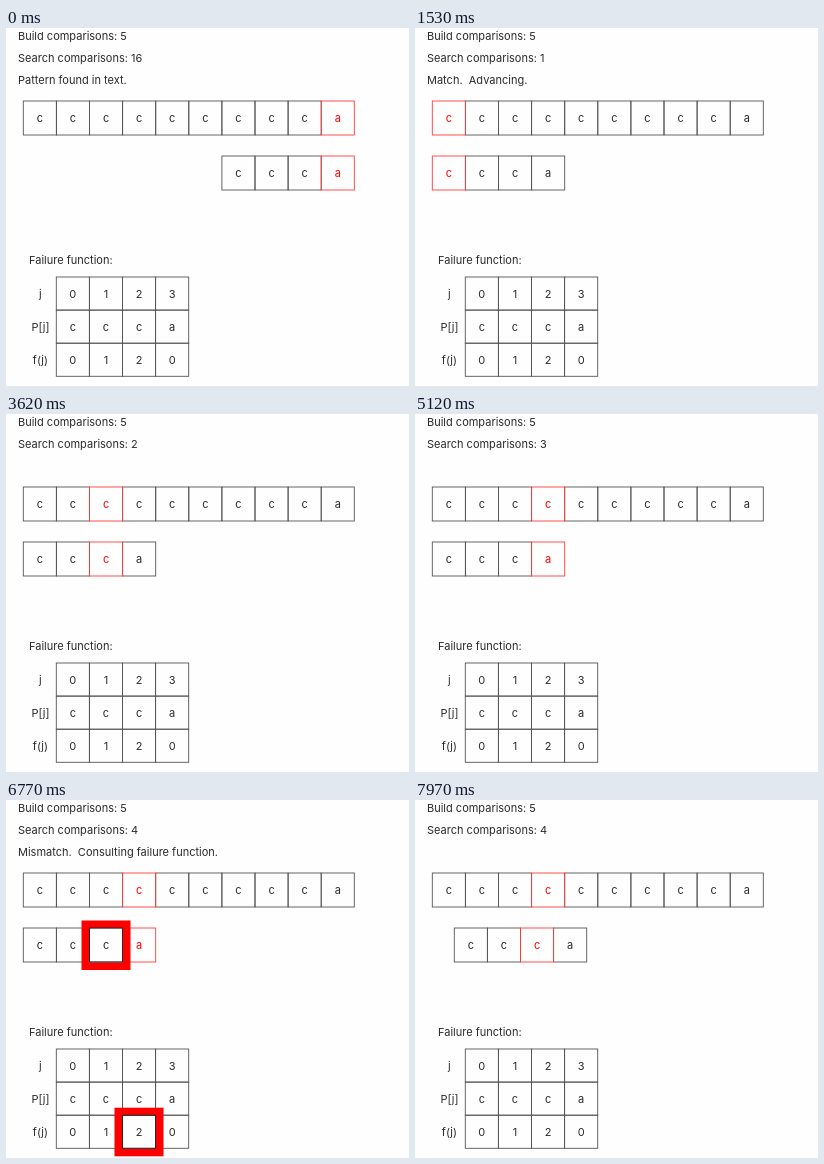
These frames come from a looping animation (403x358 px, 8000 ms). An HTML page:

```html
<!DOCTYPE html>
<html lang="en">
<head>
<meta charset="utf-8">
<title>String matching</title>
<style>
html, body { margin: 0; width: 100%; height: 100%; overflow: hidden; background: #fefefe; }
svg { display: block; width: 403px; height: 358px; }
text { font: 11px Inter, "DejaVu Sans", sans-serif; fill: #2a2a2a; white-space: pre; }
.cell rect { fill: none; stroke: #555; stroke-width: 0.9; }
.cell text, .head { text-anchor: middle; }
.cell.hot rect { stroke: #ff3c3c; }
.cell.hot text { fill: #f00; }
.cell.marked rect { stroke: #222; }
.frame { fill: none; stroke: #f00; }
</style>
</head>
<body>
<svg viewBox="0 0 403 358" id="stage"></svg>
<script>
const NS = "http://www.w3.org/2000/svg";
const stage = document.getElementById("stage");
const PITCH = 33.1, LOOP = 8000;

function add(parent, tag, attrs = {}, text = "") {
  const el = document.createElementNS(NS, tag);
  for (const key in attrs) el.setAttribute(key, attrs[key]);
  el.textContent = text;
  parent.append(el);
  return el;
}

const label = (x, y, text = "", cls = "") => add(stage, "text", { x, y, class: cls }, text);

function row(chars, x, y, h = 34) {
  const g = add(stage, "g");
  return { g, cells: [...chars].map((ch, i) => {
    const cell = add(g, "g", { class: "cell" });
    add(cell, "rect", { x: x + i * PITCH, y, width: PITCH, height: h });
    add(cell, "text", { x: x + (i + 0.5) * PITCH, y: y + h / 2 + 4 }, ch);
    return cell;
  }) };
}

label(12, 12, "Build comparisons: 5");
const count = label(12, 34);
const message = label(12, 56);
label(23, 236, "Failure function:");

const haystack = row("ccccccccca", 17.3, 73);
const needle = row("ccca", 17.3, 128);
[["j", "0123"], ["P[j]", "ccca"], ["f(j)", "0120"]].forEach(([name, chars], i) => {
  const y = 249 + i * PITCH;
  label(34.4, y + 21, name, "head");
  row(chars, 50.3, y, PITCH);
});

// Shrinking frames around the looked-up cells
const marks = add(stage, "g");
const frames = [[17.3 + 2 * PITCH, 128, 34], [50.3 + 2 * PITCH, 249 + 2 * PITCH, PITCH]].map(([x, y, h]) => {
  const frame = add(marks, "rect", { class: "frame" });
  const cell = add(marks, "g", { class: "cell marked" });
  add(cell, "rect", { x, y, width: PITCH, height: h });
  return { frame, x, y, h };
});

function drawFrames(size) {
  marks.style.display = size ? "" : "none";
  for (const { frame, x, y, h } of frames) {
    const box = {
      x: x - 0.5 - size / 2, y: y - size / 2,
      width: 34 + size, height: h + 0.5 + size, "stroke-width": size
    };
    for (const key in box) frame.setAttribute(key, box[key]);
  }
}

const MATCH = "Match.  Advancing.";
const MISS = "Mismatch.  Consulting failure function.";

// start, comparisons, message, hot text cell, hot pattern cell, pattern shift, frame size
const steps = [
  [0, 16, "Pattern found in text.", 9, 3, 6 * PITCH, 0],
  [500, 0, "", 0, 0, 0, 0],
  [1240, 1, MATCH, 0, 0, 0, 0],
  [1980, 1, "", 1, 1, 0, 0],
  [2720, 2, MATCH, 1, 1, 0, 0],
  [3620, 2, "", 2, 2, 0, 0],
  [4370, 3, MATCH, 2, 2, 0, 0],
  [5120, 3, "", 3, 3, 0, 0],
  [6020, 4, MISS, 3, 3, 0, 0],
  ...[0, 1, 2, 3, 4].map(i => [6770 + 150 * i, 4, MISS, 3, 3, 0, 7.5 - 0.8 * i]),
  ...[3, 10, 15, 22].map((shift, i) => [7520 + 150 * i, 4, "", 3, 2, shift, 0])
];

// The hot cell goes last so its outline covers its neighbours
function heat({ g, cells }, hot) {
  cells.forEach((cell, i) => cell.classList.toggle("hot", i === hot));
  g.append(cells[hot]);
}

let shown;
function tick(now) {
  const t = now % LOOP;
  const step = steps.findLast(s => s[0] <= t);
  if (step !== shown) {
    shown = step;
    const [, n, text, hotText, hotPattern, shift, size] = step;
    count.textContent = "Search comparisons: " + n;
    message.textContent = text;
    heat(haystack, hotText);
    heat(needle, hotPattern);
    needle.g.setAttribute("transform", `translate(${shift})`);
    drawFrames(size);
  }
  requestAnimationFrame(tick);
}
tick(0);
</script>
</body>
</html>
```
